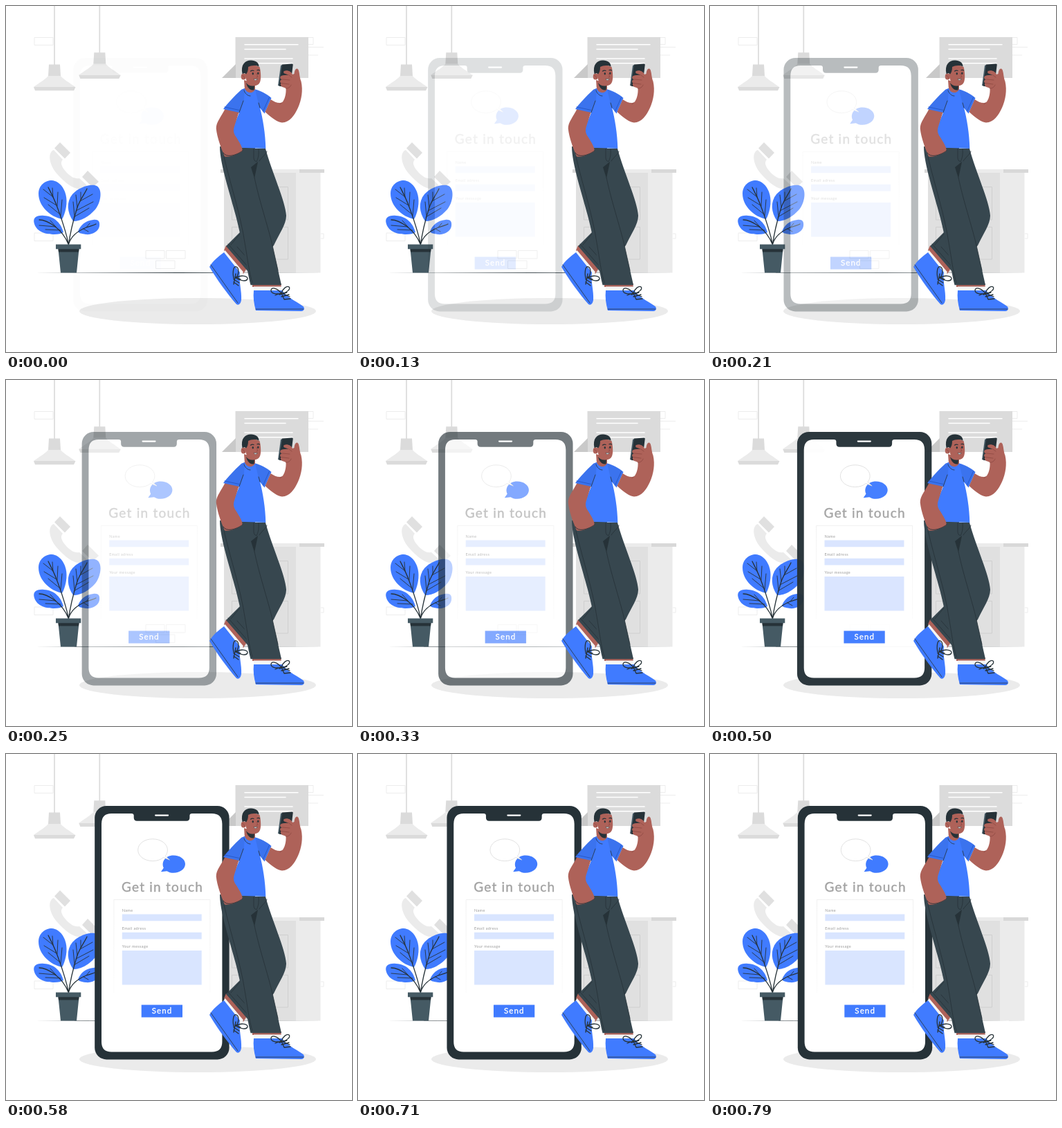
These frames come from a looping animation (500 px wide and 500 px high, 830 ms). An HTML page:

```html
<!DOCTYPE html>
<html lang="en">
<head>
<meta charset="utf-8">
<title>Get in touch</title>
<style>
  html, body { margin: 0; width: 100%; height: 100%; overflow: hidden; background: #fff; }
  svg { display: block; width: 100%; height: 100%; }
  text { font-family: Lato, "Open Sans", sans-serif; stroke-linejoin: round; }
  .title { font-size: 19px; letter-spacing: 1.25px; fill: #a3a3a3; stroke: #a3a3a3; stroke-width: .4; }
  .label { font-size: 5.5px; letter-spacing: .4px; fill: #999; }
  .send { font-size: 11.5px; letter-spacing: 1.15px; fill: #fff; stroke: #fff; stroke-width: .35; }
  .line { fill: none; stroke: #263238; stroke-linecap: round; stroke-linejoin: round; }
  .brick { fill: none; stroke: #ebebeb; stroke-width: .9; }
  .blue { fill: #407bff; }
  .sleeve { fill: #3b73ee; }
  .dark { fill: #263238; }
  .cloth { fill: #37474f; }
  .skin { fill: #ae6259; }
  .crease { fill: none; stroke: #8d4a43; stroke-width: .8; stroke-linecap: round; }
  .fold { fill: none; stroke: #2456c4; stroke-width: .9; stroke-linecap: round; }
</style>
</head>
<body>
<svg viewBox="0 0 500 500">
  <defs>
    <g id="lamp">
      <path d="M70 -20V85" stroke="#dbdbdb" stroke-width="1.7"/>
      <path d="M61 101C57 106 48 111 40 117H100C92 111 83 106 79 101Z" fill="#ebebeb"/>
      <path d="M62 84.500H78L79 101H61ZM40 117H100.500L98 122.300H42Z" fill="#dbdbdb"/>
    </g>
    <linearGradient id="fade" x1="0" y1="0" x2="0" y2="1">
      <stop offset="0" stop-color="#ededed"/>
      <stop offset="1" stop-color="#fafafa"/>
    </linearGradient>
  </defs>

  <!-- room -->
  <path class="brick" d="M41 45.500H68V56.500H41ZM437 45.500H444V55.500H437M437 59.500H459M437 71H451M41 328H68V339.500H41ZM455 329H459V336H455M202 353.500H229V365H202ZM231.500 353.500H259V365H231.500ZM216.500 368H244V379.500H216.500Z"/>
  <path class="dark" d="M42 385.500L250 384.900L455 385.500L250 386Z"/>
  <g>
    <path d="M315 241H419V385.500H315Z" fill="#e0e0e0"/>
    <path d="M419 241H454.500V385.500H419Z" fill="#ebebeb"/>
    <path d="M310 236H424V241H310Z" fill="#ebebeb"/>
    <path d="M310 236H316V241H310ZM424 236H460V241H424Z" fill="#d8d8d8"/>
    <path d="M326.500 261.500H407.500V309H326.500ZM326.500 319.500H407.500V366H326.500Z" fill="none" stroke="#cdcdcd" stroke-width=".9"/>
  </g>
  <path d="M331.500 45H437V104H331.500Z" fill="#dbdbdb"/>
  <path d="M332 84V104H312Z" fill="#c9c9c9"/>
  <path d="M345 55.700H422M345 62.500H404M345 76H414M345 82.700H414" stroke="#fff" stroke-width="1.5" stroke-linecap="round"/>
  <path d="M67 209C60 215 63 231 75 244C87 257 101 268 112 263L117 259L106 249C99 250 94 247 87 240C80 232 78 226 82 222L69 208Z" fill="#ebebeb"/>
  <path d="M78 197L93 212L85 220.500L70 205.500ZM118 238L134 254L125 262L110 247Z" fill="#e0e0e0"/>
  <use href="#lamp"/>
  <use href="#lamp" x="65.300" y="-17.300"/>
  <ellipse cx="277" cy="441" rx="171" ry="19" fill="#ebebeb"/>

  <!-- plant -->
  <g class="blue">
    <path d="M81 308C65 305 47 290 47 271C47 259 57 252 66 252C79 253 87.500 267 87.500 282C87.500 293 84 303 81 308Z"/>
    <path d="M97 311C88 298 87 283 96 272C105 262 123 256 131 260C140 265 137 284 129 294C120 304 109 311 97 311Z"/>
    <path d="M83 327C80 315 71 304 55 303C44 302 38 306 41 315C45 327 58 330 70 330C76 330 80 329 83 327Z"/>
    <path d="M104 326C107 317 115 310 126 309C133 308 136 311 135 318C134 326 124 331 115 330C109 329 105 328 104 326Z"/>
  </g>
  <g class="line" stroke-width="1.300">
    <path d="M90.500 345C88 331 79 303 73 288C69 277 64 268 61 262M90.500 345C93 325 98 307 103 291C107 280 114 271 117 264M90.500 345C87 336 81 326 70 318C63 313 54 309 48 309M91 343C94 333 104 325 116 320C122 318 127 317 130 315"/>
    <path d="M78 301L61 287M73 288L55 277M68 276L54 265M79 303L81 280M74 289L75 269M68 276L67 263M98 305L120 292M101 296L126 283M107 282L125 272M99 303L97 283M103 291L101 273M108 280L108 269M79 324L57 323M72 319L48 317M72 319L64 310M112 322L119 326M116 320L121 314" stroke-width=".9"/>
  </g>
  <path d="M72 344.500H108.300V351.300H105.500L102 385.500H79L75.500 351.300H72Z" fill="#455a64"/>
  <path class="dark" d="M75.500 351.300H105.500L105 355.500H76Z"/>

  <!-- big phone, drawn at rest -->
  <g id="phone">
    <rect class="dark" x="126.800" y="75" width="194.400" height="366.400" rx="17"/>
    <path d="M151 86H180Q183.300 86 183.300 89V92Q183.300 96.700 188 96.700H259.500Q264 96.700 264 92V89Q264 86 267.500 86H296Q311 86 311 101V416Q311 430.500 296 430.500H151Q136.600 430.500 136.600 416V101Q136.600 86 151 86Z" fill="#fff"/>
    <path d="M214.700 88.600H232.700" stroke="#fff" stroke-width="2.200" stroke-linecap="round"/>
    <path class="blue" d="M240.700 146.500C250 146.500 257.600 152 257.600 159C257.600 166 250 171.800 240.700 171.800C236.700 171.800 233.700 170.800 231.200 169.200L222.500 170.200L226.400 164.500C222.700 157 228 146.500 240.700 146.500Z"/>
    <path d="M226 149.500C222 153 216.500 154.600 210.500 154.600C198.500 154.600 189.300 147.500 189.300 138.700C189.300 129.800 198.500 122.800 210.500 122.800C222.500 122.800 232 129.800 232 138.700C232 142 230.800 145 228.800 147.500L235 153Z" fill="#fff" stroke="#dadada" stroke-width=".8"/>
    <text class="title" x="165.500" y="199">Get in touch</text>
    <path d="M154.500 345V210.500H293.500V345" fill="none" stroke="url(#fade)" stroke-width=".8"/>
    <text class="label" x="166.300" y="228">Name</text>
    <text class="label" x="166.300" y="254">Email adress</text>
    <text class="label" x="166.300" y="280">Your message</text>
    <path d="M166.400 231.600H281.300V241.200H166.400ZM166.400 257.800H281.300V267.500H166.400ZM166.400 284H281.300V333.400H166.400Z" fill="#d9e5ff"/>
    <path class="blue" d="M194.300 362.400H253.600V380.400H194.300Z"/>
    <text class="send" x="209.300" y="375.300">Send</text>
  </g>

  <!-- man: legs and shoes -->
  <path class="skin" d="M318 346L348 379L343 387L315 353Z"/>
  <path d="M316.500 353L343 384.500L339 390L314 357Z" fill="#f5f5f5"/>
  <path class="blue" d="M315 356L338 385C336 398 341 412 340 425C339 431 336 433 333 431C320 416 305 396 294 377C299 368 307 362 315 356Z"/>
  <path class="line" d="M296 374L335 429" stroke-width=".8"/>
  <path class="skin" d="M356 401H397.500V406H356Z"/>
  <path d="M358 405.500H397L398 412H358Z" fill="#f5f5f5"/>
  <path class="blue" d="M358 411L399 411C408 423 424 429 430 434.500C432 438 430 441 427 441L361 440C358 430 357 420 358 411Z"/>
  <path class="line" d="M361 438H430" stroke-width=".8"/>
  <path class="cloth" d="M345 206H375C384 240 404 282 405 303C405 315 395 329 387 346L350 384L318 347L340 325Z"/>
  <path class="line" d="M321 344L348 375M340 327L325 345M334 348L350 366" stroke-width=".8"/>
  <path class="cloth" d="M309 203L360 205C362 225 358 240 360 250C368 284 378 316 385 346L398 403.300H353.500C348 380 342 342 332 303C324 272 309 228 309 203Z"/>
  <path class="dark" d="M354 233L364 225L359 249Z"/>
  <path class="line" d="M358 206V220Q358 224 362 225Q366 218 365 207M359 248C366 282 378 316 385 346M315 218C326 264 339 302 345 342C349 364 351 384 356 400M366 224C370 218 376 214 377 210M385 346L393 382" stroke-width=".8"/>
  <g class="line" stroke-width="1.300">
    <path d="M329 394C327 383 329 375 333 377C337 379 337 388 332 393C339 388 349 390 349 394C348 399 338 397 332 393M331 391L339 395M329 395L337 400M329 399L336 404M332 387L329 402"/>
    <path d="M398 415C391 407 383 406 383 411C383 416 392 417 398 415C400 408 406 404 409 406C412 409 405 415 398 415L410 420M395 417L406 414M398 420L409 417M398 415L402 424L411 423M389 418L397 415"/>
  </g>

  <!-- man: body -->
  <path class="skin" d="M344 107L345 121C346 130 358 131 360 121L360 112Z"/>
  <path class="blue" d="M345 119L340 121L337 154C333 165 328.500 172 328.500 180L331 204.500L375.300 206C375 185 371 162 367 147L372 128L360 120.500C357 127 348 127 345 119Z"/>
  <path class="skin" d="M317 148C311 160 303.500 168 303.700 177C305 190 311 206 316 217.500C322 219 334 215 341.500 210C342.500 204 337 197 333 190C329 185 328 180 330 174L337 152Z"/>
  <path class="line" d="M314 212C318 220 333 216 342 209" stroke-width=".9"/>
  <path class="sleeve" d="M345 119L340 121C330 130 320 141 314 149L337 154L344 136ZM360 120.500C368 122.500 377 127 383.500 133L373.500 155.500L366 146Z"/>
  <path class="fold" d="M316 146L337 150.500M371.500 152L380.500 132"/>
  <path class="line" d="M337 154L343 137M367 147L365 140M344 122C345 126 349 130 353 130" stroke-width=".8"/>

  <!-- man: head -->
  <path class="dark" d="M347 111C351 116 355 116 359 115L358.500 121.500C353 122 349 119 347 111Z"/>
  <path class="skin" d="M346 90C345 98 346 106 349 110.500C353 116.500 363 117 366.500 111C369 106 368.500 96 366.500 88L352 83Z"/>
  <ellipse class="skin" cx="343.300" cy="102" rx="3.600" ry="4.500"/>
  <path class="crease" d="M341.700 100.500C343 100.500 344.500 102 344.500 104M362 97.500L364 102.500L361.500 103"/>
  <path class="dark" d="M341.500 98C339 85 345 78.500 354 78.500C361 78.500 365.500 82 365.500 87.500C360 85 354 86 350 88C350 93 349 96 347 98.500L345 97Z"/>
  <path class="line" d="M353.500 94.200Q355.500 92.300 358 93.500M363 92.800Q365 91.800 366.500 93" stroke-width="1.200"/>
  <g class="dark">
    <ellipse cx="356.800" cy="97.800" rx="1.200" ry="1.700"/>
    <ellipse cx="364.300" cy="97.300" rx="1.100" ry="1.700"/>
  </g>
  <path d="M358 105Q361 106.300 363.500 105.300Q362 107.800 359.500 107.300Z" fill="#fff" stroke="#263238" stroke-width=".5"/>

  <!-- man: raised arm with handset -->
  <path d="M397 86L400 84.500L397 116L393 115Z" fill="#455a64"/>
  <path class="dark" d="M399 85Q399 84.500 400 84.500L413.500 83.500Q415 83.500 414.700 85L411 115Q410.500 117 409 117L396 116Q394.500 116 394.800 114Z"/>
  <path class="skin" d="M382.500 135L374.500 153C383 161 392 168 399 168.500C410 168 417 158 422 147C427 136 429.500 122 426.500 109C424 103 424.500 97 422.500 92C420.500 88.500 417 91 416.500 98L414 99C412 94 406 92 402 94C400 95.500 401.500 97.500 404 98L409 100C405 99.500 398 100 396.500 102C395.500 104.500 397 106 399.500 106C396 106.500 395 109.500 397.500 111.500C395.500 114 398 117 401 117.500L404.500 119C405 127 403 135 399 139.500C394 141 388 139 382.500 135Z"/>
  <path class="crease" d="M399.500 106L410 107M397.500 111.500L409 113M404.500 119C408 119.500 411 117 412 114M409 100L413 103M399 139.500L396 142"/>
</svg>
<script>
  const LOOP = 830, FPS = 24, FRAMES = 20, SHIFT = 30;
  const phone = document.getElementById('phone');

  const cubic = (a, b, s) => 3 * (1 - s) ** 2 * s * a + 3 * (1 - s) * s * s * b + s ** 3;

  // Overshooting ease: bisect for the curve parameter, then read its height
  function ease(x) {
    let lo = 0, hi = 1;
    for (let i = 0; i < 24; i++) {
      const mid = (lo + hi) / 2;
      if (cubic(.36, .5, mid) < x) lo = mid; else hi = mid;
    }
    return cubic(-.01, 1.38, hi);
  }

  function draw(ms) {
    const step = Math.floor(ms % LOOP * FPS / 1000 + .1);
    const k = ease(Math.min(1, (step + 1) / FRAMES));
    phone.setAttribute('transform', `translate(${SHIFT * (k - 1)} 0)`);
    phone.setAttribute('opacity', Math.max(0, Math.min(1, k)));
  }

  const start = performance.now();
  function tick() {
    draw(performance.now() - start);
    requestAnimationFrame(tick);
  }
  tick();
</script>
</body>
</html>
```
